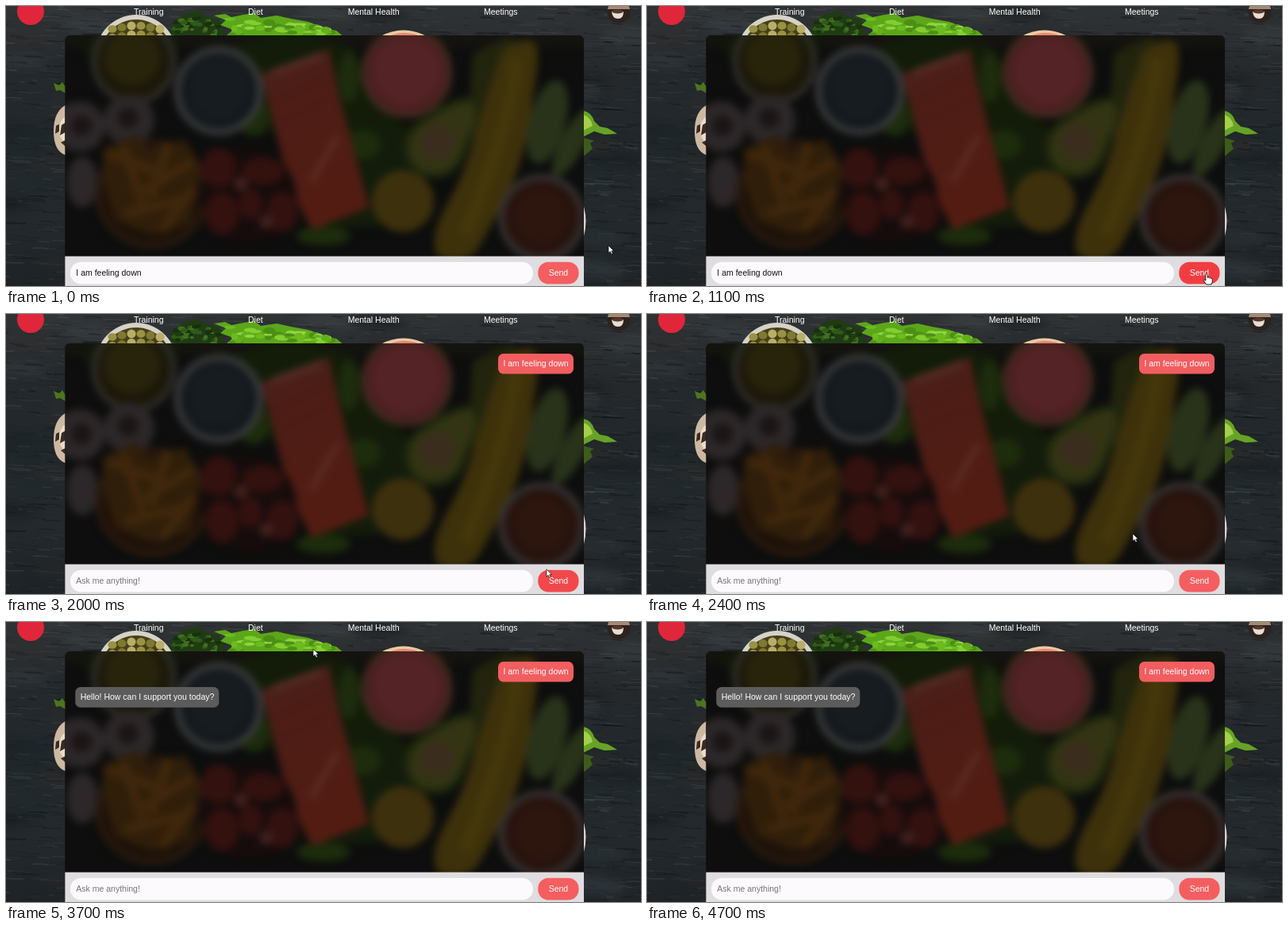
Write an HTML page with a canvas that moves like this. It is 800 by 353 pixels and loops after 4.8 s.

```html
<!DOCTYPE html>
<html lang="en">
<head>
<meta charset="utf-8">
<title>Wellness chat</title>
<style>
  html, body { margin: 0; width: 100%; height: 100%; overflow: hidden; background: #1d2327; }
  canvas, svg { position: absolute; left: 0; top: 0; width: 800px; height: 353px; display: block; }
  text { font: 10.5px "Liberation Sans", Arial, sans-serif; fill: #fff; white-space: pre; }
  .soft { filter: blur(5px); }
</style>
</head>
<body>
<canvas id="wood" width="800" height="353"></canvas>
<svg id="stage" viewBox="0 0 800 353">
  <defs>
    <clipPath id="panel"><path d="M74.4 316V44q0-7 7-7H721q7 0 7 7V316z"/></clipPath>
    <clipPath id="face"><circle cx="772" cy="7" r="14.5"/></clipPath>
    <linearGradient id="fish" x1="0" y1="0" x2=".3" y2="1">
      <stop offset="0" stop-color="#46251f"/><stop offset=".3" stop-color="#4c1d16"/><stop offset="1" stop-color="#531c12"/>
    </linearGradient>
  </defs>

  <!-- food around the panel -->
  <path d="M204 38l6-17 14-11 17-4 12 7 16 4 8 21z" fill="#203b13"/>
  <g id="herbs"></g>
  <circle cx="164" cy="62" r="51" fill="#d6d2c8"/>
  <circle cx="164" cy="62" r="45" fill="#45401a"/>
  <g id="olives"></g>
  <path d="M262 12l14-2 8 4 15-3 14-2 8 6 20-3 18 4 22 4 18 8 17 3 10 8H276l10-9-16-6 7-6z" fill="#5ba719"/>
  <g id="leaves"></g>
  <path d="M472 38q28-15 58 0z" fill="#e9c9a4"/>
  <path d="M482 38q20-8 40 0z" fill="#e5856c"/>
  <path d="M75 125q-15 8-15 33t15 30z" fill="#cdb8a2"/>
  <path d="M75 139q-8 5-8 17t8 17z" fill="#eadccb"/>
  <path d="M70 150l5-3v12l-7 4zM69 172l6-3v8zM63 151l4-2v9l-5 3z" fill="#3d2a20"/>
  <path d="M60 97l7 3 4-4 4 6v8l-7-4-5 1z" fill="#4d7420"/>
  <path d="M727 132q11 2 14 13l7 7 10 2 12 7-16 1-13-4-14 7z" fill="#67a326"/>
  <path d="M727 137q10 3 12 14l-12 6z" fill="#a3cf4b"/>
  <path d="M727 166l14 4-5 3 3 7-12 10z" fill="#3c5c1c"/>
  <path d="M728 253q5 18 0 37z" fill="#d8d5cf"/>

  <!-- panel -->
  <g clip-path="url(#panel)">
    <path d="M74 37h654v279H74z" fill="#0d0e0d"/>
    <g class="soft">
      <path d="M60 26h680v26H60z" fill="#14130f"/>
      <path d="M92 48l32-18h100l-14 50-80 24z" fill="#12180a"/>
      <path d="M286 52l70-22 84 24 28 70 50 40-18 60-70 30-60-70-70-50z" fill="#121c09"/>
      <path d="M400 160l80-12 32 52-44 78-88 4z" fill="#131c0b"/>
      <path d="M588 60l48-22 14 20-36 88-30-24z" fill="#23240d"/>
      <g fill="#1c2c0c">
        <ellipse cx="312" cy="140" rx="20" ry="24"/><ellipse cx="432" cy="90" rx="13" ry="32"/>
        <ellipse cx="450" cy="175" rx="22" ry="18"/><ellipse cx="400" cy="290" rx="34" ry="12"/>
      </g>
      <circle cx="161" cy="70" r="50" fill="#1b1809" stroke="#2f2e2a" stroke-width="7"/>
      <circle cx="159" cy="65" r="35" fill="#28230b"/>
      <circle cx="268" cy="107" r="52" fill="#14191d" stroke="#393a3a" stroke-width="8"/>
      <circle cx="268" cy="103" r="36" fill="#171c21"/>
      <path d="M321 86l86-32 11 52 39 148-72 28-28-56z" fill="url(#fish)"/>
      <path d="M335 84l62-22M384 222l34-58" stroke="#643a31" stroke-width="9" opacity=".45"/>
      <circle cx="505" cy="84" r="54" fill="#4b1f20" stroke="#40291f" stroke-width="7"/>
      <circle cx="505" cy="82" r="42" fill="#542325"/>
      <path d="M506 190q-8-32 24-48 34-26 60-24 14 18-8 54-12 42-42 42-26 0-34-24z" fill="#323413" stroke="#1d260d" stroke-width="7"/>
      <circle cx="543" cy="172" r="22" fill="#3a2d1d"/>
      <path d="M625 58q28-22 42-10 7 12-3 64-6 68-32 126l-36 66q-20 26-53 10-10-20 10-59 30-52 39-99z" fill="#3d310b"/>
      <path d="M643 66q-5 78-65 222" fill="none" stroke="#4a3b0d" stroke-width="18" opacity=".6"/>
      <g fill="#29331a">
        <ellipse cx="682" cy="146" rx="23" ry="54" transform="rotate(15 682 146)"/>
        <ellipse cx="714" cy="172" rx="15" ry="48" transform="rotate(28 714 172)"/>
      </g>
      <circle cx="500" cy="246" r="39" fill="#3d300c"/>
      <circle cx="675" cy="267" r="51" fill="#27130e" stroke="#353130" stroke-width="8"/>
      <circle cx="674" cy="265" r="32" fill="#2d160e"/>
      <g fill="#2c2728">
        <circle cx="93" cy="152" r="32"/><circle cx="155" cy="144" r="32"/>
        <ellipse cx="96" cy="222" rx="20" ry="32"/>
      </g>
      <g fill="#1b1516"><circle cx="95" cy="151" r="13"/><circle cx="154" cy="141" r="13"/></g>
      <ellipse cx="184" cy="237" rx="68" ry="65" fill="#1c1109" stroke="#2b1a0e" stroke-width="7"/>
      <path d="M122 180l44-18 12 20 47-14 21 34-14 72-48 14-46-18-16-52z" fill="#2f1e0a"/>
      <path d="M128 186l60 22M148 176l24 74M205 172l-22 70M236 196l-62 36M150 262l74-18M196 284l40-54" stroke="#452a0c" stroke-width="12" opacity=".75"/>
      <ellipse cx="306" cy="240" rx="60" ry="60" fill="#160c0c"/>
      <g fill="#33110f">
        <ellipse cx="268" cy="204" rx="22" ry="25"/><ellipse cx="324" cy="208" rx="26" ry="17"/>
        <ellipse cx="272" cy="262" rx="21" ry="27"/><ellipse cx="348" cy="260" rx="20" ry="25"/>
        <ellipse cx="308" cy="250" rx="15" ry="19"/>
      </g>
      <g fill="#40201e"><circle cx="296" cy="224" r="9"/><circle cx="328" cy="272" r="9"/></g>
    </g>
  </g>

  <!-- navigation -->
  <circle cx="31" cy="7" r="17" fill="#e0263a"/>
  <g clip-path="url(#face)">
    <path d="M756-9h32v32h-32z" fill="#2d221e"/>
    <path d="M756-9h32v13h-32z" fill="#a58a72"/>
    <path d="M763 7h15q0 9-7 9t-8-9z" fill="#e6ddd3"/>
    <ellipse cx="770.5" cy="7" rx="7" ry="2.5" fill="#59382a"/>
  </g>
  <text x="161" y="10.6">Training</text>
  <text x="305" y="10.6">Diet</text>
  <text x="430.7" y="10.6">Mental Health</text>
  <text x="602" y="10.6">Meetings</text>

  <!-- messages -->
  <g id="sent">
    <rect x="620" y="50" width="95" height="25.5" rx="6.5" fill="#f25d60"/>
    <text x="626.4" y="66.3">I am feeling down</text>
  </g>
  <g id="reply">
    <rect x="87.3" y="82" width="181" height="25.7" rx="6.5" fill="#5c5c5c"/>
    <text x="93.7" y="98.3">Hello! How can I support you today?</text>
  </g>

  <!-- input bar -->
  <path d="M74.4 315.4h653.6v38H74.4z" fill="#dfdddf"/>
  <rect x="81" y="322.7" width="583" height="27.8" rx="13.5" fill="#fdfafd"/>
  <text id="field" x="88.3" y="340.2"></text>
  <rect id="button" x="670.3" y="322.7" width="51.2" height="27.8" rx="13"/>
  <text x="683.7" y="340.2">Send</text>

  <g id="cursor">
    <path id="arrow" d="M0 0V9.3L2.2 7.4 3.8 10.8 5.4 10 3.9 6.8H6.8z" fill="#fff" stroke="#111" stroke-width=".7"/>
    <path id="hand" d="M-1.2 1Q0-1 1.2 1V5Q2.8 4 3.5 5.3 5 4.6 5.6 5.9 7.3 5.5 7.3 7.3V10L6 13.6H-.2L-3.9 8.8Q-3.8 7-1.2 8.6z" fill="#fff" stroke="#111" stroke-width=".9"/>
  </g>
</svg>
<script>
const LOOP = 4800, STEP = 100;
const $ = id => document.getElementById(id);

function seeded(s) {
  return () => (s = (s * 16807) % 2147483647) / 2147483647;
}

function paintWood() {
  const c = $('wood').getContext('2d'), rnd = seeded(77);
  const base = c.createLinearGradient(0, 0, 0, 353);
  ['#303335', '#24292d', '#20272b', '#23292d', '#1d2327'].forEach((col, i) => base.addColorStop(i / 4, col));
  c.fillStyle = base;
  c.fillRect(0, 0, 800, 353);

  // worn patches under the grain
  c.filter = 'blur(6px)';
  for (let i = 0; i < 90; i++) {
    c.globalAlpha = 0.15 + rnd() * 0.3;
    c.fillStyle = ['#0f1417', '#434a4e', '#37302c'][i % 3];
    c.beginPath();
    c.ellipse(rnd() * 800, rnd() * 353, 20 + rnd() * 35, 4 + rnd() * 8, 0.05, 0, 7);
    c.fill();
  }
  c.filter = 'none';

  const tones = ['#0b1013', '#13191c', '#3c4448', '#53595b', '#40382f'];
  for (let i = 0; i < 2600; i++) {
    const x = rnd() * 840 - 40, y = rnd() * 353, len = 5 + rnd() * 26;
    c.globalAlpha = 0.12 + rnd() * 0.35;
    c.strokeStyle = tones[Math.floor(rnd() * tones.length)];
    c.lineWidth = 0.5 + rnd() * 1.5;
    c.beginPath();
    c.moveTo(x, y);
    c.quadraticCurveTo(x + len / 2, y + rnd() * 5 - 2, x + len, y + 1);
    c.stroke();
  }
}

function scatter(id, n, seed, tones, place) {
  const rnd = seeded(seed);
  let out = '';
  for (let i = 0; i < n; i++) {
    const [x, y, rx, ry] = place(rnd, i);
    out += `<ellipse cx="${x}" cy="${y}" rx="${rx}" ry="${ry}" fill="${tones[i % tones.length]}"/>`;
  }
  $(id).innerHTML = out;
}

// time, x, y of the pointer tip
const path = [
  [0, 759, 302], [200, 759, 302], [600, 719, 329], [1000, 705, 337.5],
  [1800, 705, 337.5], [2400, 612, 277], [3100, 386, 31],
  [3300, 386, 31], [3700, 387, 34], [4200, 387, 34], [4600, 392, -16], [LOOP, 392, -16]
];

function pointer(t) {
  const i = path.findIndex(p => p[0] > t);
  const [t0, x0, y0] = path[i - 1], [t1, x1, y1] = path[i];
  const u = (t - t0) / (t1 - t0), k = u * u * (3 - 2 * u);
  return [x0 + (x1 - x0) * k, y0 + (y1 - y0) * k];
}

const show = (id, on) => $(id).setAttribute('visibility', on ? 'visible' : 'hidden');
const clamp = v => Math.max(0, Math.min(1, v));

function draw(t) {
  const [x, y] = pointer(t);
  const over = x > 670 && x < 721.5 && y > 322 && y < 351;
  $('cursor').setAttribute('transform', `translate(${x} ${y})`);
  show('arrow', !over);
  show('hand', over);

  const hover = clamp((t - 600) / 300) - clamp((t - 1900) / 300);
  const mix = (a, b) => Math.round(a + (b - a) * hover);
  $('button').setAttribute('fill', `rgb(${mix(244, 241)},${mix(94, 61)},${mix(96, 66)})`);

  show('sent', t >= 1300);
  show('reply', t >= 3700);
  const typed = t < 1700;
  $('field').textContent = typed ? 'I am feeling down' : 'Ask me anything!';
  $('field').style.fill = typed ? '#111' : '#757575';
}

function tick() {
  draw(Math.floor(performance.now() % LOOP / STEP) * STEP);
  requestAnimationFrame(tick);
}

paintWood();
scatter('olives', 12, 9, ['#9a9142', '#7f7930', '#b9ae68'], (r, i) => {
  const col = i % 6 - 2.5;
  return [164 + col * 12, 24 + Math.floor(i / 6) * 11 + Math.abs(col) * 2, 5.6, 4.8 + r() * 0.8];
});
scatter('herbs', 40, 15, ['#2f5a1b', '#18300f', '#41701f'], r => {
  const x = 210 + r() * 58;
  return [x, 12 + Math.abs(x - 240) * 0.3 + r() * 18, 2 + r() * 3, 1 + r() * 2];
});
scatter('leaves', 45, 31, ['#6cbc1f', '#83cd31', '#4c8f16', '#93d445', '#62b01b'], r => {
  const x = 282 + r() * 130, top = 15 + Math.max(0, x - 340) * 0.22;
  return [x, top + r() * (36 - top), 4 + r() * 7, 1.5 + r() * 3];
});
draw(0);
tick();
</script>
</body>
</html>
```
